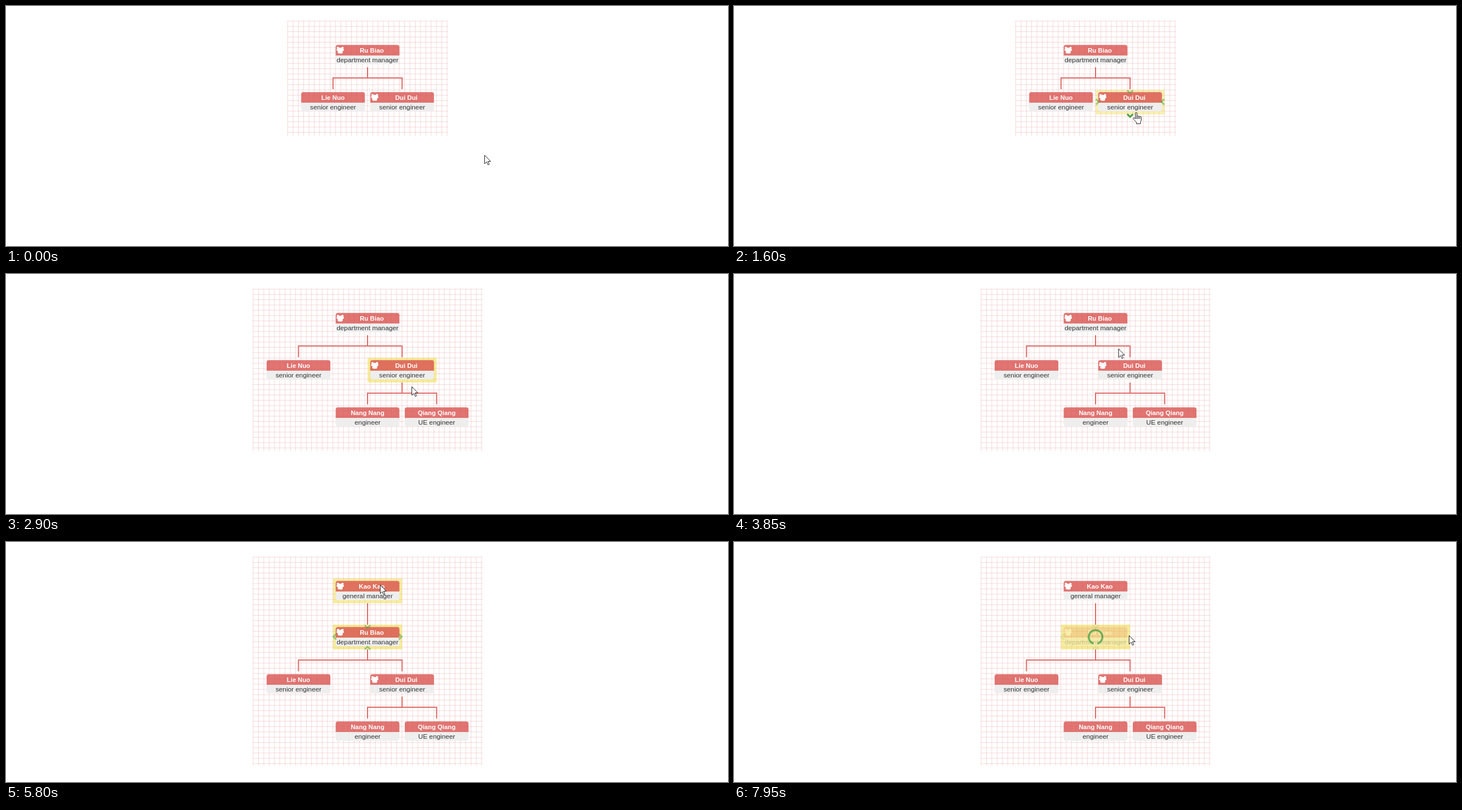
Animation, 1280 px wide and 427 px high, one loop 8000 ms. Source, as an HTML page:

```html
<!DOCTYPE html>
<html lang="en">
<head>
<meta charset="utf-8">
<title>Org chart</title>
<style>
  html, body { margin: 0; width: 100%; height: 100%; overflow: hidden; background: #fff; }
  svg { display: block; width: 100%; height: 100%; }
  text { font: 11.8px "Liberation Sans", Arial, sans-serif; text-anchor: middle; fill: #333; }
  .title { font-weight: bold; font-size: 11.3px; fill: #fff; }
  .bar { fill: rgba(217, 83, 79, .8); }
  .role { fill: #eee; }
  .icon { fill: #fff; }
  .glow { fill: rgba(238, 217, 54, .5); }
  .grid { fill: none; stroke: rgba(200, 0, 0, .15); }
  .line { fill: none; stroke: rgba(217, 83, 79, .85); stroke-width: 2; }
  .chevron { fill: none; stroke: rgba(68, 157, 68, .5); stroke-width: 3; }
  .hot .chevron { stroke: #449d44; }
  .ring { fill: none; stroke: rgba(68, 157, 68, .8); stroke-width: 3.2; stroke-dasharray: 326 34; }
  .pointer { fill: #fff; stroke: #222; stroke-linejoin: round; }
  .step { animation: 8s step-end infinite; }
  .ease { animation: 8s ease infinite; }
  .move { animation: 8s ease-in-out infinite; }
  .spin { animation: spin 1.6s linear infinite; }
  @keyframes spin { to { transform: rotate(360deg); } }
</style>
</head>
<body>
<svg id="stage" viewBox="0 0 1280 427"></svg>
<script>
const LOOP = 8000, SPIN = 1600, FADE = 450, DIM = .2;
const SCALE = .942, CENTER = 641, TOP = 65;
const LEVEL = 84, DROP = 82, SLOT = 130 * SCALE, HALF = SLOT / 2;

// Times in ms: when children and a parent are added, and each click that loads them.
const CHILDREN = 2900, PARENT = 5500;
const CLICK_DOWN = 2050, CLICK_UP = 4800, CLICK_SIDE = 7150;
// Spans in which the pointer rests on a node or on one of its edges.
const ON_BRANCH = [1400, 3800], ON_BOSS = [PARENT, 6300];
const ON_HEAD = [[4000, 6150], [6450, LOOP]];
const EDGE_DOWN = [1400, CLICK_DOWN], EDGE_UP = [4200, CLICK_UP], EDGE_SIDE = [6650, CLICK_SIDE];

const rules = [];
const at = (x, y, content) => `<g transform="translate(${x} ${y})">${content}</g>`;

// Wraps content in a group that runs the stops [ms, css].
function animate(kind, stops, content, extra = '') {
  const name = `track-${rules.length}`;
  const body = stops.map(([ms, css]) => `${ms / LOOP * 100}%{${css}}`).join('');
  rules.push(`@keyframes ${name}{${body}}`);
  return `<g class="${kind} ${extra}" style="animation-name:${name}">${content}</g>`;
}
const opacity = (kind, stops, content, extra) =>
  animate(kind, stops.map(([ms, v]) => [ms, `opacity:${v}`]), content, extra);
const move = (x, y) => `transform:translate(${x}px,${y}px)`;

// Alternately shows and hides at the given times.
const shown = (times, content, extra) =>
  opacity('step', [[0, 0], ...times.map((ms, i) => [ms, 1 - i % 2])], content, extra);

// Eases from rest to peak in each span and snaps back at its end.
const pulse = (spans, ramp, rest, peak, content) => opacity('ease', [[0, rest],
  ...spans.flatMap(([from, to]) => [[from, rest], [from + ramp, peak], [to - 1, peak], [to, rest]]),
  [LOOP, rest]], content);

function grid(slots, height) {
  const width = (42 + slots * 130) * SCALE, pitch = 10 * SCALE;
  const x = CENTER + .2 - width / 2, y = 26.4;
  const repeat = (size, draw) =>
    Array.from({ length: Math.ceil(size / pitch) }, (_, i) => draw((i + .05) * pitch)).join('');
  return `<path class="grid" d="${repeat(width, d => `M${x + d} ${y}v${height}`)}"/>
    <path class="grid" d="${repeat(height, d => `M${x} ${y + d}h${width}`)}"/>`;
}

const fork = (x, y, left, right) =>
  `<path class="line" d="M${x} ${y}v19M${left} ${y + 39}v-20H${right}v20"/>`;

const team = at(-48.5, 13.5, `<g class="icon">
  <circle cx="-4" cy="-4" r="2.1"/><circle cx="4" cy="-4" r="2.1"/>
  <rect x="-6.5" y="-2.5" width="13" height="4" rx="1.8"/>
  <circle cy="-1.6" r="3"/><rect x="-4.4" width="8.8" height="6" rx="2.2"/></g>`);

const face = (title, role, lead) => `
  <path class="bar" d="M-56.5 23.3v-15q0-4 4-4h105q4 0 4 4v15z"/>
  <path class="role" d="M-56.5 23.3v11.3q0 4 4 4h105q4 0 4-4v-11.3z"/>
  ${lead ? team : ''}
  <text class="title" x="${lead ? 7.5 : 0}" y="17.7">${title}</text>
  <text y="35">${role}</text>`;

const glow = spans => pulse(spans, FADE, 0, 1,
  `<rect class="glow" x="${-HALF}" width="${SLOT}" height="44"/>`);

const TURNS = { down: 0, left: 90, up: 180, right: 270 };
const chevron = (x, y, way) =>
  `<path class="chevron" transform="translate(${x} ${y}) rotate(${TURNS[way]})" d="M-5-2.5L0 2.5L5-2.5"/>`;
const sideEdge = (side, way) => chevron(side * 58, 21.5, way);
const rowEdge = (y, way) => chevron(0, y + (way === 'down' ? 2 : -2), way);
const topEdge = way => rowEdge(1.5, way);
const bottomEdge = way => rowEdge(43.8, way);

const spinner = (from, to) => shown([from, to], at(0, 22,
  `<g class="spin" style="animation-delay:${from % SPIN}ms">
    <circle class="ring" r="12.2" pathLength="360" transform="rotate(-73)"/></g>`));

function branch() {
  const loads = [[CLICK_DOWN, CHILDREN]];
  const edges = topEdge('down') + sideEdge(-1, 'right') + sideEdge(1, 'left');
  return glow([ON_BRANCH]) +
    pulse(loads, 1, 1, DIM, face('Dui Dui', 'senior engineer', true)) +
    shown([ON_BRANCH[0], CHILDREN], pulse(loads, 200, 1, DIM, edges)) +
    shown(EDGE_DOWN, bottomEdge('down'), 'hot') +
    spinner(CLICK_DOWN, CHILDREN);
}

function head() {
  const loads = [[CLICK_UP, PARENT], [CLICK_SIDE, LOOP]];
  const edges = sideEdge(-1, 'left') + bottomEdge('up') +
    shown([0, EDGE_SIDE[0]], sideEdge(1, 'right')) +
    shown([0, EDGE_UP[0]], topEdge('up')) +
    shown([PARENT], topEdge('down'));
  return glow(ON_HEAD) +
    pulse(loads, 1, 1, DIM, face('Ru Biao', 'department manager', true)) +
    shown(ON_HEAD.flat().slice(0, 3), pulse(loads, 200, 1, DIM, edges)) +
    shown(EDGE_UP, topEdge('up'), 'hot') +
    shown(EDGE_SIDE, sideEdge(1, 'right'), 'hot') +
    spinner(CLICK_UP, PARENT) + spinner(CLICK_SIDE, LOOP);
}

function tree() {
  const left = CENTER - HALF, right = CENTER + HALF, row = TOP + LEVEL;
  const forkTop = TOP + 44;
  const children = fork(right, forkTop + LEVEL, CENTER, CENTER + SLOT) +
    at(CENTER, row + LEVEL, face('Nang Nang', 'engineer')) +
    at(CENTER + SLOT, row + LEVEL, face('Qiang Qiang', 'UE engineer'));
  return shown([0, CHILDREN], fork(CENTER, forkTop, left, right)) +
    shown([CHILDREN], fork(CENTER, forkTop, left - HALF, right) + children) +
    animate('step', [[0, move(left, row)], [CHILDREN, move(left - HALF, row)]],
      face('Lie Nuo', 'senior engineer')) +
    at(right, row, branch()) + at(CENTER, TOP, head());
}

const boss = () => `<path class="line" d="M${CENTER} ${TOP + 44}v38"/>` +
  at(CENTER, TOP, glow([ON_BOSS]) + face('Kao Kao', 'general manager', true));

function pointer() {
  const trips = [
    { from: 700, to: 1500, x: 712, y: 192 },
    { from: CLICK_DOWN, to: 2200, x: 719, y: 200 },
    { from: 3450, to: 4250, x: 644, y: 66 },
    { from: 4950, to: 5250, x: 663, y: 76 },
    { from: 6100, to: 6700, x: 700, y: 166 },
  ];
  let place = move(848, 265);
  const stops = [[0, place]];
  for (const { from, to, x, y } of trips) {
    stops.push([from, place], [to, place = move(x, y)]);
  }
  stops.push([LOOP, place]);

  const arrow = '<path class="pointer" d="M.5.5v15.2l3.6-3.4 2.4 5.4 2.3-1-2.4-5.2h4.8z"/>';
  const fingers = [0, 1, 2, 3].map(i => {
    const y = i ? 6 + i * .5 : .5;
    return `<rect class="pointer" x="${4.6 + i * 2.6}" y="${y}" width="2.7" height="${14 - y}" rx="1.3"/>`;
  }).join('');
  const palm = '<path class="pointer" d="M4.6 12L2.6 9.8Q-.3 9.800 1 12.200L6.500 18v2.500h7v-3l1.600-3.500v-2"/>';
  const onEdge = [EDGE_DOWN, EDGE_UP, EDGE_SIDE].flat();
  return animate('move', stops,
    shown([0, ...onEdge], arrow) + shown(onEdge, at(-5, -3, fingers + palm)));
}

document.getElementById('stage').innerHTML =
  shown([0, CHILDREN], grid(2, 205)) +
  shown([CHILDREN, PARENT], grid(3, 205 + LEVEL)) +
  shown([PARENT], grid(3, 205 + LEVEL + DROP)) +
  animate('step', [[0, move(0, 0)], [PARENT, move(0, DROP)]], tree()) +
  shown([PARENT], boss()) +
  pointer();

const sheet = document.createElement('style');
sheet.textContent = rules.join('\n');
document.head.append(sheet);
</script>
</body>
</html>
```
